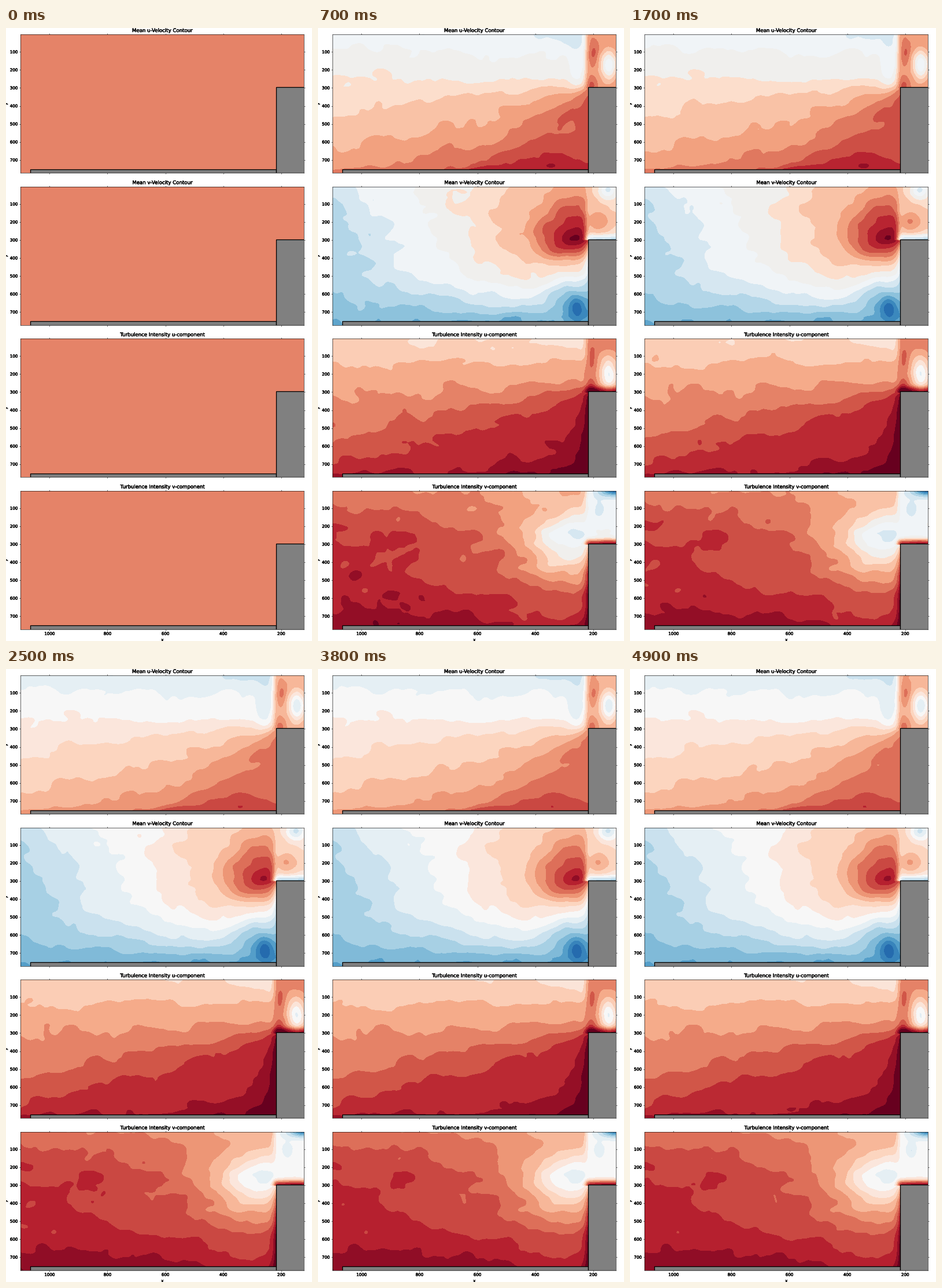
A matplotlib script that plays this animation: 529x1058 px, repeating every 5 s.

```python
import numpy as np
import matplotlib.pyplot as plt
from matplotlib.animation import FuncAnimation
from matplotlib.colors import LinearSegmentedColormap
from matplotlib.patches import Rectangle
from matplotlib.patheffects import withStroke

W, H, DPI = 529, 1058, 100
PX = 72 / DPI                      # points per pixel
FRAMES, INTERVAL = 50, 100
LEFT, RIGHT, TALL = 25.3, 515.4, 238.9
TOPS = [11.3 + 262.5 * i for i in range(4)]
WALL, LEDGE, FLOOR = 467.2, 90.9, 232.3   # solid parts, from the panel's top
FLAT = "#e58368"

plt.rcParams.update({"font.family": "DejaVu Sans", "axes.linewidth": 0.6 * PX})
rng = np.random.default_rng(12)

# Diverging map, blue to red
CMAP = LinearSegmentedColormap.from_list("flow", [
    (0, "#053061"), (.1, "#2166ac"), (.2, "#4393c3"), (.3, "#92c5de"),
    (.4, "#d1e5f0"), (.47, "#f0f4f7"), (.5, "#f7f7f7"), (.53, "#f0efed"),
    (.556, "#fbe6db"), (.6, "#fddbc7"), (.7, "#f4a582"), (.8, "#d6604d"),
    (.9, "#b2182b"), (1, "#67001f")], N=1024)

xs = np.linspace(25, 516.5, 246)
ys = np.linspace(0, 239.5, 121)    # measured from the panel's top
X, Y = np.meshgrid(xs, ys)


def gauss(cx, cy, rx, ry):
    return np.exp(-((X - cx) / rx) ** 2 - ((Y - cy) / ry) ** 2)


def step(v, width):
    return 1 / (1 + np.exp(-np.clip(v / width, -40, 40)))


def wall(width):
    """Layer along the upright face, below the ledge."""
    return np.exp((np.minimum(X, WALL) - WALL) / width) * step(Y - 95, 4)


def strata(first, lines):
    """Layers whose edges bend from a left to a right height by a power."""
    u = np.clip((xs - 25) / (WALL - 25), 0, 1)
    b = np.array([a + (z - a) * u**p for a, z, p in lines])
    b = np.vstack([b[0] - 30, b, b[-1] + 40])
    k = np.arange(len(b)) + first - 1
    return np.array([np.interp(ys, col, k) for col in b.T]).T


def join(left, right):
    """Main flow, with the flow above the ledge on its right."""
    w = step(X - 463.5, 2.5) * (Y < LEDGE + 1)
    return left * (1 - w) + right * w


def mean_u():
    left = strata(8, [(-6, 22, 6), (27, 42, 3), (83, 74, 1), (143, 86, .6),
                      (203, 89, 1.2), (232, 92, 2.2), (243, 96, 3.7),
                      (257, 204, 1.2), (280, 246, 1)])
    left += .6 * gauss(403, 226, 25, 6) - 1.3 * gauss(446, 65, 16, 28)
    right = (13.2 + 1.1 * gauss(477, 31, 7, 18) + 1.5 * gauss(473, 88, 9, 11)
             - 5 * gauss(503, 53, 16, 28))
    return join(left, right)


def mean_v():
    fade = 1 - np.clip((Y - 100) / 125, 0, 1) ** 2
    base = 5.3 + (1.1 + (np.minimum(X, 360) - 25) / 66) * fade
    base += .9 * gauss(60, 0, 140, 55) - .6 * step(Y - 232, 4)
    dy = Y - 89
    cone = 17.6 - np.hypot(X - 447, np.where(dy > 0, 2 * dy, dy)) / 15
    left = .6 * np.logaddexp(base / .6, cone / .6)
    left -= (2.6 * gauss(445, 185, 50, 40) + 2.6 * gauss(447, 210, 16, 20)
             + 5 * wall(7) * step(150 - Y, 20))
    right = (11 + 2.2 * gauss(485, 60, 20, 18) - 3.5 * gauss(501, 7, 17, 15)
             - 5 * step(Y - 85, 3))
    return join(left, right)


def turb_u():
    left = strata(10, [(-6, 30, 6), (43, 40, 1), (92, 72, 1), (178, 88, .7),
                       (230, 98, .95), (235, 150, 5), (242, 215, 8)])
    left += 2.4 * wall(9)
    right = (12.3 + 1.3 * gauss(474, 34, 8, 22) - 4.4 * gauss(503, 61, 16, 28)
             + 4.6 * step(Y - 85, 2.5) + 1.5 * gauss(472, 82, 9, 14))
    return join(left, right)


def turb_v():
    left = 15.4 - 2.1 * np.exp(-Y / 45) + 1.4 * np.maximum(Y - 170, 0) / 70
    left -= (5 * gauss(447, 83, 75, 50) + 2.4 * gauss(440, 78, 210, 100)
             + gauss(430, 215, 130, 60))
    left += 3 * wall(6)
    right = (8.6 - 1.4 * gauss(487, 34, 9, 13) - 7 * gauss(515, -2, 28, 12)
             + 8 * step(Y - 86, 2.5))
    return join(left, right)


def noise(n):
    """n smooth random fields of unit spread."""
    spec = np.fft.fft2(rng.standard_normal((n,) + X.shape))
    fy = np.fft.fftfreq(len(ys))[:, None]
    fx = np.fft.fftfreq(len(xs))[None]
    out = 0
    for sx, sy, gain in ((9, 5, .8), (3, 2.4, .6)):
        g = np.exp(-2 * np.pi**2 * ((fx * sx) ** 2 + (fy * sy) ** 2))
        f = np.fft.ifft2(spec * g).real
        out = out + gain * f / f.std()
    return out


def running_mean(base, still, loose, top=17.99):
    """Snapshots averaged up to each step; the picture settles with time."""
    mean = np.cumsum(noise(FRAMES - 1), axis=0)
    mean /= np.arange(1, FRAMES)[:, None, None]
    return np.clip(base + still * noise(1)[0] + loose * mean, .01, top)


def palette(shift, count):
    return [CMAP(min(max((k + shift) / count, 0), 1)) for k in range(18)]


# title, field at each step, usual and wider colour scale
PANELS = [
    ("Mean u-Velocity Contour", running_mean(mean_u(), .09, .25),
     palette(0, 17), palette(0, 18)),
    ("Mean v-Velocity Contour", running_mean(mean_v(), .11, .3),
     palette(0, 17), palette(0, 18)),
    ("Turbulence Intensity u-component",
     running_mean(turb_u(), .09, .28, 16.99), palette(0, 16), palette(0, 16)),
    ("Turbulence Intensity v-component", running_mean(turb_v(), .13, .38),
     palette(0, 17), palette(1, 18)),
]

fig = plt.figure(figsize=(W / DPI, H / DPI), dpi=DPI, facecolor="white")
BOLD = [withStroke(linewidth=.35, foreground="black")]
SMALL, LARGE = 7.14 * PX, 8.57 * PX


def label(x, y, s, size, **kw):
    fig.text(x / W, 1 - y / H, s, fontsize=size, path_effects=BOLD, **kw)


def make_panel(top, title, last):
    bottom = top + TALL
    ax = fig.add_axes([LEFT / W, 1 - bottom / H, (RIGHT - LEFT) / W, TALL / H])
    ax.set(xlim=(LEFT, RIGHT), ylim=(bottom, top), facecolor=FLAT)
    ax.autoscale(False)
    ax.set_xticks([75.3 + 100.1 * i for i in range(5)],
                  range(1000, 0, -200))
    ax.set_yticks([top + 30 + 31.08 * i for i in range(7)],
                  range(100, 800, 100))
    ax.tick_params(length=2.5 * PX, width=.6 * PX, pad=2.5 * PX,
                   labelsize=SMALL, top=True, right=True, labelbottom=last)
    for t in ax.get_xticklabels() + ax.get_yticklabels():
        t.set_path_effects(BOLD)
    for x, y, w in ((42, FLOOR, WALL - 42), (WALL, LEDGE, 60)):
        ax.add_patch(Rectangle((x, top + y), w, TALL - y, facecolor="#808080",
                               edgecolor="black", linewidth=1.3 * PX, zorder=2))
    middle = (LEFT + RIGHT) / 2
    label(middle, top - 4.3, title, LARGE, ha="center", va="baseline")
    label(2.6, top + TALL / 2, "y", SMALL, ha="right", va="center", rotation=90)
    if last:
        label(middle, 1053.5, "x", SMALL, ha="center", va="top")
    return ax


axes = [make_panel(top, p[0], i == 3)
        for i, (top, p) in enumerate(zip(TOPS, PANELS))]
drawn = []


def clear():
    while drawn:
        drawn.pop().remove()
    return []


def update(n):
    clear()
    if n == 0:
        return []
    wide = 21 <= n <= 28 or n >= 38
    for ax, top, (_, field, usual, wider) in zip(axes, TOPS, PANELS):
        drawn.append(ax.contourf(xs, ys + top - .2, field[n - 1],
                                 levels=np.arange(19),
                                 colors=wider if wide else usual, zorder=1))
    return []


anim = FuncAnimation(fig, update, frames=FRAMES, init_func=clear,
                     interval=INTERVAL, repeat=True, repeat_delay=0, blit=False)
plt.show()
```
